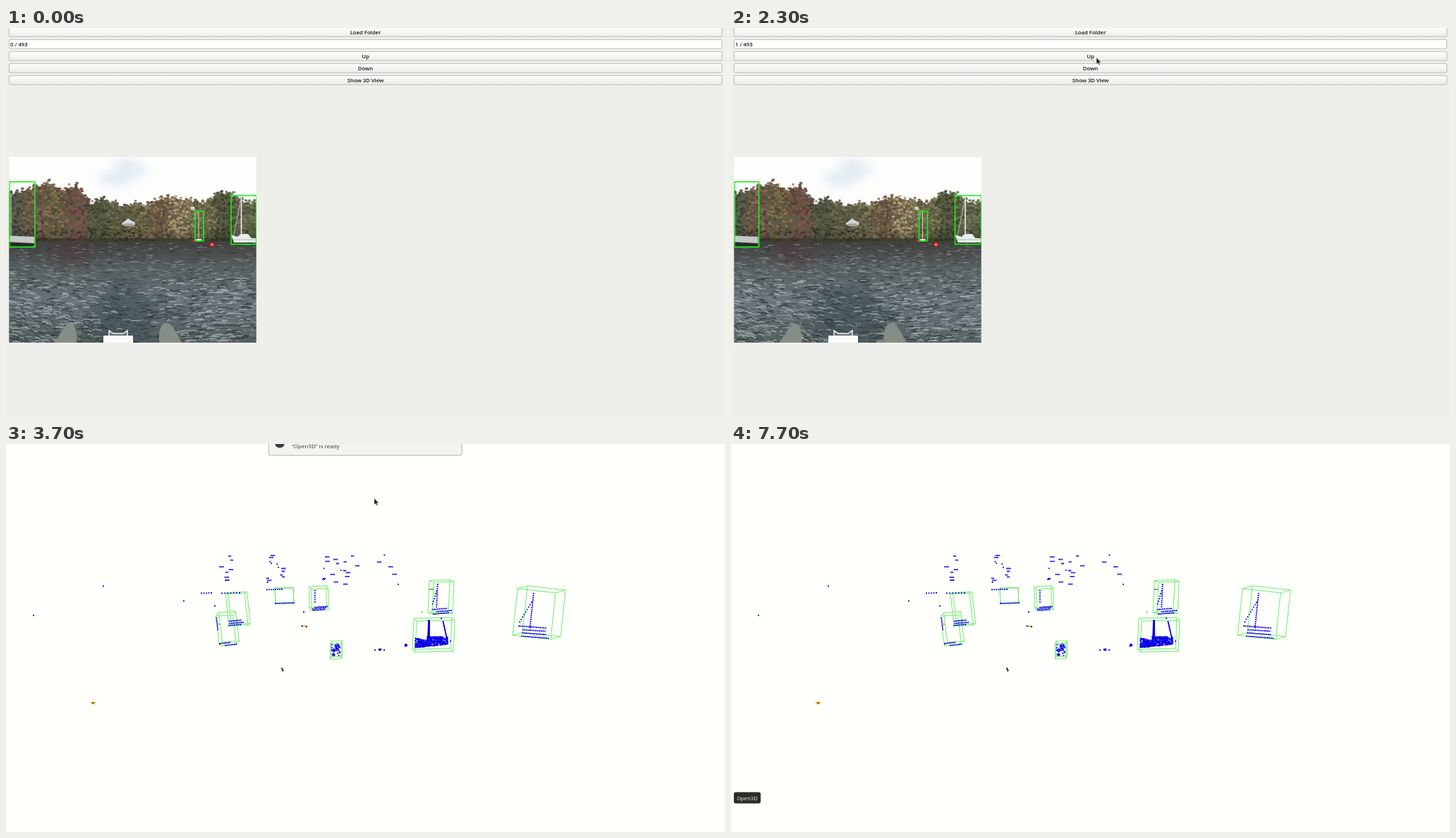
An HTML page that plays this animation: 1019x550 px, repeating every 8 s.

```html
<!DOCTYPE html>
<html lang="en">
<head>
<meta charset="utf-8">
<title>Lake labelling tool</title>
<style>
  html, body { margin: 0; width: 100%; height: 100%; overflow: hidden; background: #eeeeea; }
  svg { display: block; width: 100%; height: 100%; }
  text { font: 600 7.7px "Open Sans", "Noto Sans", sans-serif; fill: #161616; }
</style>
</head>
<body>
<svg id="stage" viewBox="0 0 1019 550" preserveAspectRatio="xMinYMin meet">
  <defs>
    <linearGradient id="face" x2="0" y2="1"><stop stop-color="#fdfdfc"/><stop offset="1" stop-color="#ecece9"/></linearGradient>
    <linearGradient id="bar" x2="0" y2="1"><stop stop-color="#615f5c"/><stop offset="1" stop-color="#53524f"/></linearGradient>
    <linearGradient id="lake" x2="0" y2="1">
      <stop stop-color="#40413e"/><stop offset=".25" stop-color="#585f60"/>
      <stop offset=".6" stop-color="#69757a"/><stop offset="1" stop-color="#56625f"/>
    </linearGradient>
    <filter id="soft" x="-50%" y="-50%" width="200%" height="200%"><feGaussianBlur stdDeviation="7"/></filter>
    <filter id="blur"><feGaussianBlur stdDeviation=".55"/></filter>
    <clipPath id="photo"><rect x="4.3" y="183" width="350.4" height="263"/></clipPath>
  </defs>
</svg>
<script>
const LOOP = 8000;
const stage = document.getElementById('stage');
const defs = stage.querySelector('defs');

function add(parent, tag, attrs = {}, text) {
  const el = document.createElementNS('http://www.w3.org/2000/svg', tag);
  for (const k in attrs) el.setAttribute(k, attrs[k]);
  if (text !== undefined) el.textContent = text;
  parent.appendChild(el);
  return el;
}
const group = (parent, attrs) => add(parent, 'g', attrs);
const rect = (parent, x, y, width, height, attrs) => add(parent, 'rect', { x, y, width, height, ...attrs });
const path = (parent, d, attrs) => add(parent, 'path', { d, fill: 'none', ...attrs });
const ellipse = (parent, cx, cy, rx, ry, attrs) => add(parent, 'ellipse', { cx, cy, rx, ry, ...attrs });
const label = (parent, x, y, text, attrs) => add(parent, 'text', { x, y, ...attrs }, text);
const show = (el, on) => el.setAttribute('visibility', on ? 'visible' : 'hidden');
const fix = n => n.toFixed(1);
const mix = (a, b, p) => a + (b - a) * p;

function random(seed) {
  return () => {
    seed = seed + 0x6D2B79F5 | 0;
    let r = Math.imul(seed ^ seed >>> 15, 1 | seed);
    r = r + Math.imul(r ^ r >>> 7, 61 | r) ^ r;
    return ((r ^ r >>> 14) >>> 0) / 4294967296;
  };
}

// Collects many strokes under one path per style.
function brush() {
  const paths = {};
  return {
    stroke(style, d) { paths[style] = (paths[style] || '') + d; },
    draw(g, attrs) { for (const k in paths) path(g, paths[k], attrs(k)); }
  };
}

// Main panel

const panel = group(stage);
rect(panel, 0, 0, 1019, 550, { fill: '#eeeeea' });

const ROW = 17;
const slot = (i, fill) => rect(panel, 4.5, i * ROW - .5, 1010, 12.7, { rx: 1.5, fill, stroke: '#b9b9b4', 'stroke-width': .9 });
function button(i, text) {
  const face = slot(i, 'url(#face)');
  label(panel, 509.5, i * ROW + 8.5, text, { 'text-anchor': 'middle' });
  return face;
}
button(0, 'Load Folder');
slot(1, '#fffffd');
const counter = label(panel, 6, ROW + 8.5, '');
const upButton = button(2, 'Up');
button(3, 'Down');
const viewButton = button(4, 'Show 3D View');

// Lake photo

// Tree line heights every 20 px, foliage colours every 30 px.
const ridge = [234, 229, 222, 217, 228, 220, 246, 239, 249, 247, 249, 238, 238, 240, 245, 232, 233, 244, 244];
const foliage = ['4d5547', '74584a', '706143', '774a46', '4c553f', '5b5d42', '6d674a', '7a6049', 'a08d6a', '74704e', '4a5437', '626c4e'];

function treeTop(x) {
  const i = Math.max(0, Math.min(17, Math.floor(x / 20)));
  return mix(ridge[i], ridge[i + 1], x / 20 - i) + 3 * Math.sin(x * .9) * Math.sin(x * .23);
}
function shade(hex, k) {
  const channels = hex.match(/../g).map(c => Math.min(255, Math.round(parseInt(c, 16) * k)));
  return `rgb(${channels})`;
}

function drawShore(g) {
  const rnd = random(11), leaves = brush();
  let d = 'M-4 303';
  for (let x = -4; x <= 370; x += 4) d += `L${x} ${fix(treeTop(x) + 4)}`;
  path(g, d + 'V303Z', { fill: '#5d5a45' });
  for (let i = 0; i < 2600; i++) {
    const x = rnd() * 366, top = treeTop(x), y = mix(top, 302, rnd());
    const zone = Math.min(11, Math.floor((x + rnd() * 16 - 8) / 30 + .2));
    const low = Math.max(0, (y - 278) / 24) * .35;
    const k = .7 + Math.floor(rnd() * 5) * .14 - Math.round(low * 5) / 5;
    leaves.stroke(shade(foliage[Math.max(0, zone)], k), `M${fix(x)} ${fix(y)}h${fix(rnd() * 2 + .1)}`);
  }
  leaves.draw(g, stroke => ({ stroke, 'stroke-width': 3.2, 'stroke-linecap': 'round', opacity: .8 }));
  rect(g, -4, 298, 374, 6, { fill: '#34352c', opacity: .7 });
  path(g, 'M164 277L173 270L183 276V279H165Z', { fill: '#d3d7d9' });
  rect(g, 168, 277, 12, 4, { fill: '#a3a59f' });
  rect(g, 262, 253, 5, 5, { fill: '#d2ccc0' });
}

function drawBoats(g) {
  path(g, 'M-2 294L40 296V305L-2 303Z', { fill: '#c4c9c8' });
  path(g, 'M-2 304L39 306V309H-2Z', { fill: '#24292a' });
  path(g, 'M7 235V294M273 260V299', { stroke: '#ced2ce', 'stroke-width': 1 });
  path(g, 'M269 299H278L276 302H270Z', { fill: '#e2e4e4' });
  path(g, 'M333.5 238V294', { stroke: '#efefed', 'stroke-width': 1.6 });
  path(g, 'M333 242L323 293', { stroke: '#b9bcb8', 'stroke-width': .9 });
  path(g, 'M319 293L328 296L333 292H343L348 298H362V304H323Z', { fill: '#e9ecec' });
  path(g, 'M321 300H362', { stroke: '#a4adb2', 'stroke-width': .8 });
}

function drawWater(g, seed) {
  const rnd = random(seed), waves = brush();
  rect(g, 4, 303, 352, 144, { fill: 'url(#lake)' });
  ellipse(g, 92, 318, 32, 20, { fill: '#54383a', opacity: .45, filter: 'url(#soft)' });
  ellipse(g, 165, 410, 50, 42, { fill: '#42525a', opacity: .6, filter: 'url(#soft)' });
  for (let i = 0; i < 2300; i++) {
    const v = rnd(), x = rnd() * 358, y = 305 + v * 141;
    const calm = v > .3 ? Math.exp(-(((x - 165) / 55) ** 2)) : 0;
    const bright = rnd() < .52 - calm * .4 - (v < .15 ? .3 : 0);
    const tone = bright ? (rnd() < .4 ? '#c3cbcc' : '#929fa3') : (rnd() < .5 - calm * .3 ? '#262b2c' : '#434c4f');
    const len = 3 + rnd() * (4 + v * 8), tilt = (x < 165 ? 1 : -.3) * v * 3 * rnd();
    waves.stroke(`${tone} ${v < .35 ? .7 : 1.2}`,
      `M${fix(x)} ${fix(y)}q${fix(len / 2)} ${fix(-v * 2)} ${fix(len)} ${fix(tilt)}`);
  }
  const layer = group(g, { opacity: .68 });
  waves.draw(layer, style => {
    const [stroke, width] = style.split(' ');
    return { stroke, 'stroke-width': width, 'stroke-linecap': 'round' };
  });
}

function drawDeck(g) {
  path(g, 'M67 447C76 438 83 420 90 419C97 418 101 428 100 447Z', { fill: '#848e86' });
  path(g, 'M217 447C216 428 220 418 227 418C237 418 242 436 250 447Z', { fill: '#848e86' });
  path(g, 'M146 437V429L152 433H166L172 429V437', { fill: '#6c7678', stroke: '#f5f6f6', 'stroke-width': 1.5 });
  rect(g, 138, 436, 42, 11, { fill: '#fbfbfb' });
}

function drawSky(g) {
  const rnd = random(3);
  rect(g, 4, 183, 352, 122, { fill: '#fdfdfc' });
  const clouds = group(g, { filter: 'url(#soft)', fill: '#c6dcea', opacity: .5 });
  for (let i = 0; i < 9; i++)
    ellipse(clouds, 128 + rnd() * 58, 190 + rnd() * 36, 10 + rnd() * 14, 4 + rnd() * 5);
}

drawShore(group(defs, { id: 'shore', filter: 'url(#blur)' }));

const targets = [[-5, 218, 41, 310.5], [268, 260, 280, 302], [319, 237.5, 358, 306.5]];

// The camera drifts a little between pictures.
const scenes = [0, 1, 2].map(i => {
  const drift = -1.5 * i;
  const g = group(panel, { 'clip-path': 'url(#photo)' });
  drawSky(g);
  add(g, 'use', { href: '#shore', x: drift });
  drawWater(g, 40 + i);
  drawBoats(group(g, { transform: `translate(${drift})` }));
  drawDeck(g);
  for (const [l, t, r, b] of targets) {
    const left = Math.max(5, l + drift), right = Math.min(354.7, r + drift);
    rect(g, left, t, right - left, b - t, { fill: 'none', stroke: '#19f019', 'stroke-width': 1.6 });
  }
  rect(g, 289.7 + drift, 305, 4.6, 4, { fill: '#e8b0a8', stroke: '#f01010', 'stroke-width': 1.5 });
  rect(g, 263.4 + drift, 300.5, 3.4, 3, { fill: '#e01515' });
  return g;
});

// Point cloud

// Front face corner, size, lean and skew; offset of the back face; mast position and length; base rows.
const cages = [
  { x: 725, y: 205, w: 54, h: 66, lean: -7, skew: 6, back: [14, -4], mast: .43, tall: .8, stay: .28, rows: 4 },
  { x: 606, y: 196, w: 29, h: 45, lean: -2, skew: -1, back: [-6, -2.5], mast: .2, tall: .78, stay: .2, rows: 3 },
  { x: 582, y: 251, w: 54, h: 44, lean: -2, skew: -1, back: [-4, -4], rows: 0 },
  { x: 433, y: 206, w: 24, h: 30, lean: 0, skew: -1, back: [-3, -4], mast: .2, tall: .6, rows: 3 },
  { x: 381, y: 204, w: 26, h: 22, lean: 1, skew: -.5, back: [0, .6], rows: 1 },
  { x: 311, y: 212.5, w: 27, h: 45, lean: 5, skew: -1, back: [3.5, -2], rows: 3 },
  { x: 297.5, y: 244, w: 24, h: 42, lean: 5, skew: -1.5, back: [4, -5], mast: .02, tall: .45, rows: 2 },
  { x: 459.5, y: 283, w: 15.5, h: 22, lean: 0, skew: -.7, back: [1.5, -3.5], rows: 0 }
];
const corner = (c, u, v) => [c.x + u * c.w + v * c.lean, c.y + v * c.h + u * c.skew];

function cageOutline(c) {
  const [dx, dy] = c.back;
  const front = [[0, 0], [1, 0], [1, 1], [0, 1]].map(([u, v]) => corner(c, u, v));
  const back = front.map(([x, y]) => [x + dx, y + dy]);
  return `M${front.join(' ')}ZM${back.join(' ')}Z` + front.map((p, i) => `M${p}L${back[i]}`).join('');
}

function cloudDots() {
  const rnd = random(5);
  let d = '';
  const dot = (x, y) => { d += `M${fix(x - .9)} ${fix(y)}h1.8`; };
  const run = ([x1, y1], [x2, y2], step = 2.9) => {
    const n = Math.max(1, Math.round(Math.hypot(x2 - x1, y2 - y1) / step));
    for (let i = 0; i <= n; i++) dot(mix(x1, x2, i / n), mix(y1, y2, i / n));
  };

  for (const c of cages) {
    if (c.mast) run(corner(c, c.mast, .07), corner(c, c.mast, c.tall));
    if (c.stay) run(corner(c, c.mast, .2), corner(c, c.mast - c.stay, c.tall - .1), 4);
    for (let i = 0; i < c.rows; i++) {
      const v = 1 - i * .07, wide = c.rows === 1 ? 1 : .55 + rnd() * .2;
      const u = (1 - wide) * (c.rows === 1 ? 0 : rnd());
      run(corner(c, u, v), corner(c, u + wide, v - .02), 2.5);
    }
  }

  // Far shore: short rows gathered in columns of centre, spread and count.
  for (const [x, spread, count] of [[309, 10, 7], [380, 13, 13], [474, 26, 17], [545, 20, 5]])
    for (let i = 0; i < count; i++) {
      const px = x + (rnd() * 2 - 1) * spread, py = mix(157, 199, (i + rnd()) / count);
      run([px, py], [px + Math.floor(rnd() * 3) * 2.2, py], 2.2);
    }
  run([277, 211.5], [291, 211], 3.4);
  run([306, 211.5], [331, 211], 4);
  run([370, 206.5], [391, 206]);
  for (const [x, y] of [[39, 243], [138, 201.5], [252, 222.5], [296, 229.5], [422, 238], [523, 292], [536, 292], [617, 247], [630, 279.5]])
    dot(x, y);

  // Sailing boat
  run([599, 250], [598, 276], .8);
  run([600, 251], [600, 276], .8);
  run([619.5, 252], [626, 281], 1.6);
  for (let i = 0; i < 520; i++) {
    const p = rnd(), high = p < .36 ? 275 + p * 9 : 273;
    dot(580 + p * 46, mix(high, 289 - p * 5, rnd()));
  }

  // Small craft
  for (let i = 0; i < 55; i++) {
    const p = rnd(), legs = Math.abs(p - .5) > .15;
    dot(461.5 + p * 12, 284 + rnd() * (legs ? 16 : 9));
  }
  for (let i = 0; i < 10; i++) {
    dot(528.5 + rnd() * 3, 290 + rnd() * 2.5);
    dot(565 + rnd() * 3, 283 + rnd() * 4);
  }
  return d;
}

function drawCloud(g) {
  path(g, cages.map(cageOutline).join(''), { stroke: '#6cec6c', 'stroke-width': 1 });
  path(g, cloudDots(), { stroke: '#0a00e6', 'stroke-width': 1.8 });
  path(g, 'M599 206H606', { stroke: '#3aa84a', 'stroke-width': 1.5 });
  ellipse(g, 123.5, 367, 3.8, 2.3, { fill: '#f3c95c' });
  rect(g, 122.5, 366, 2, 2, { fill: '#4b3a20' });
  rect(g, 420, 257, 6, 2.4, { fill: '#edb544' });
  path(g, 'M418.5 258H420.5M425 259H427', { stroke: '#26208c', 'stroke-width': 1.8 });
  path(g, 'M390 318.5H392.5M391 321H393.5', { stroke: '#3d3548', 'stroke-width': 2.4 });
  path(g, 'M299.5 255.5H303M588 238.5H590.5', { stroke: '#d08a3c', 'stroke-width': 1.6 });
}
drawCloud(group(defs, { id: 'cloud' }));

// Opening window

const popup = group(stage);
rect(popup, 109, 93, 801, 460, { fill: '#fefefa', opacity: .83 });
add(popup, 'use', { href: '#cloud', transform: 'translate(109.5 115) scale(.785 .79)', opacity: .86 });
rect(popup, 109, 93, 801, 16, { fill: 'url(#bar)' });
label(popup, 509.5, 103.6, 'Open3D', { 'text-anchor': 'middle', style: 'font-size:6.6px;font-weight:700;fill:#efefec' });
path(popup, 'M871 102.5H874.5M885.5 100.5H888.5V103H885.5ZM886.5 99.5H889.5V102', { stroke: '#d8d7d3', 'stroke-width': .7 });
ellipse(popup, 902, 101, 4.2, 4.2, { fill: '#e9704a' });
path(popup, 'M900.5 99.5L903.5 102.5M903.5 99.5L900.5 102.5', { stroke: '#4a2a20', 'stroke-width': .8 });
rect(popup, 372, 0, 273, 1, { fill: '#dcdcd8', opacity: .7 });

// Full screen view

const viewer = group(stage);
rect(viewer, 0, 0, 1019, 550, { fill: '#fffffb' });
add(viewer, 'use', { href: '#cloud' });

const notice = group(stage);
rect(notice, 371.5, -10, 275.5, 27, { rx: 4, fill: '#000', opacity: .12 });
rect(notice, 372.5, -10, 273.5, 26, { rx: 3, fill: '#f3f3f1', stroke: '#b9b9b5', 'stroke-width': .9 });
ellipse(notice, 388, -1.5, 7, 7, { fill: '#3c3c3c' });
label(notice, 405, 5.6, '“Open3D” is ready', { style: 'font-size:8px;font-weight:400;fill:#3a3a3a' });

const tip = group(stage);
rect(tip, 4, 493.5, 38, 16, { rx: 3, fill: '#2c2c2a' });
label(tip, 23, 504.6, 'Open3D', { 'text-anchor': 'middle', style: 'font-weight:400;fill:#f4f4f2' });

const cursor = path(stage, 'M0 0V9L2.1 7.2L3.5 10.3L4.9 9.7L3.5 6.7H6.2Z',
  { fill: '#161616', stroke: '#fff', 'stroke-width': .5, 'stroke-opacity': .7 });

// Pointer legs: start and end time, end point, sag of the path.
const legs = [
  [200, 800, 518, 42, 38],
  [2500, 3000, 522, 77, 0],
  [4900, 5100, 931, 4, 0],
  [5880, 6400, 208, 423, 0],
  [6500, 6900, 8, 471, 0],
  [7000, 7100, 2, 474, 0]
];
function pointer(t) {
  let x = 198, y = 9;
  for (const [from, to, toX, toY, sag] of legs) {
    if (t < from) break;
    const p = Math.min(1, (t - from) / (to - from));
    x = mix(x, toX, p);
    y = mix(y, toY, p) + (p < 1 ? sag * Math.sin(Math.PI * p) : 0);
  }
  return [x, y];
}

const during = (t, from, to) => t >= from && t < to;
const press = (el, on) => el.setAttribute('fill', on ? '#dcdcd9' : 'url(#face)');

function render(now) {
  const t = Math.floor(now % LOOP / 100) * 100;
  const index = t < 1500 ? 0 : t < 2500 ? 1 : 2;

  counter.textContent = `${index} / 493`;
  scenes.forEach((g, i) => show(g, i === index));
  press(upButton, during(t, 1300, 1400) || during(t, 2100, 2300));
  press(viewButton, during(t, 3100, 3400));

  show(popup, during(t, 3600, 3700));
  show(viewer, t >= 3700);
  show(notice, during(t, 3700, 3800));
  show(tip, t >= 7500);
  tip.setAttribute('opacity', Math.min(1, (t - 7400) / 300));

  cursor.setAttribute('transform', `translate(${pointer(t).map(fix)})`);
  show(cursor, during(t, 200, 5200) || during(t, 5900, 7300));
}

const start = performance.now();
(function tick() {
  render(performance.now() - start);
  requestAnimationFrame(tick);
})();
</script>
</body>
</html>
```
